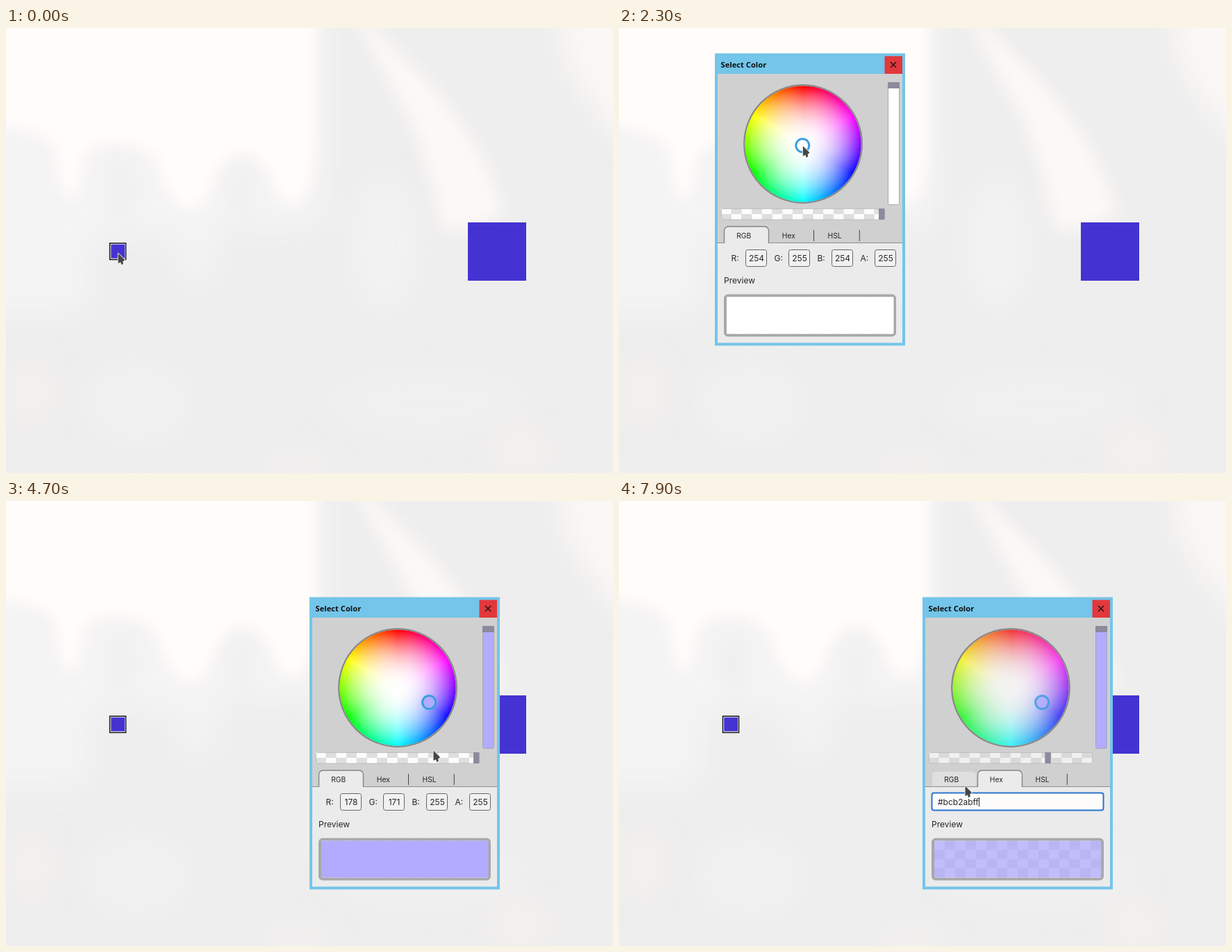
These frames come from a looping animation (874 by 641 pixels, 8 s). An HTML page with a canvas:

```html
<!DOCTYPE html>
<html lang="en">
<head>
<meta charset="utf-8">
<title>Color picker</title>
<style>
html, body { margin: 0; width: 100%; height: 100%; overflow: hidden; background: #eee; }
canvas { display: block; width: 874px; height: 641px; }
</style>
</head>
<body>
<canvas id="stage" width="874" height="641"></canvas>
<script>
const W = 874, H = 641, LOOP = 8000, STEP = 100;
const BLUE = '#4433d2', SKY = '#73c5e9', PANEL = '#ebebeb', GREY = '#d0d0d0';
const HANDLE = '#8b8b9c', INK = '#262626';
const CX = 265, CY = 167, RADIUS = 83.5;
const stage = document.getElementById('stage').getContext('2d');

function layer(w, h) {
  const canvas = document.createElement('canvas');
  canvas.width = w;
  canvas.height = h;
  return canvas.getContext('2d');
}

// Rows are [time, ...values]; values ease from one row to the next.
function track(rows, t) {
  const next = rows.findIndex(row => row[0] > t);
  if (next === 0) return rows[0].slice(1);
  if (next < 0) return rows[rows.length - 1].slice(1);
  const a = rows[next - 1], b = rows[next];
  const p = (t - a[0]) / (b[0] - a[0]);
  const k = p * p * (3 - 2 * p);
  return a.slice(1).map((v, i) => v + (b[i + 1] - v) * k);
}

const pointerPath = [
  [400, 161, 324], [500, 162, 324], [1100, 162, 324], [1500, 286, 38], [1600, 288, 43],
  [1800, 269, 150], [2400, 264, 171], [3000, 264, 171], [3100, 291, 51],
  [3200, 291, 51], [3500, 590, 153.5], [3600, 590, 153.5], [3900, 563, 273],
  [4000, 563, 273], [4400, 610, 290], [4700, 615, 359], [4900, 677, 367],
  [5700, 596, 370], [5800, 597, 370], [6000, 608, 370], [6400, 545, 396],
  [6600, 545, 398], [7000, 520, 430], [7500, 520, 430], [7900, 498, 410]
];
const windowPath = [[3200, 0, 0], [3500, 299, 102]];
const windowFade = [[900, 0], [1000, 0.4], [1100, 1], [3000, 1], [3200, 0.8], [3600, 0.8], [3800, 1]];
const pickPath = [[1800, 0, 0], [1900, 4, -14], [2400, -0.7, 4.5], [4000, -0.7, 4.5], [4400, 45.6, 21.3]];
const alphaPath = [[4900, 255], [5700, 176], [5800, 176], [6000, 188]];

// Hue runs counter-clockwise from red at the top.
function wheelColor(x, y) {
  const sat = Math.min(1, Math.hypot(x, y) / RADIUS) ** 2.2;
  const hue = (Math.atan2(-x, -y) * 3 / Math.PI + 6) % 6;
  return [5, 3, 1].map(n => {
    const k = (n + hue) % 6;
    return Math.floor(255 * (1 - sat * Math.max(0, Math.min(k, 4 - k, 1))));
  });
}

function makeWheel() {
  const c = layer(170, 170), image = c.createImageData(170, 170);
  for (let y = 0; y < 170; y++) {
    for (let x = 0; x < 170; x++) {
      image.data.set([...wheelColor(x - 84.5, y - 84.5), 255], (y * 170 + x) * 4);
    }
  }
  c.putImageData(image, 0, 0);
  return c.canvas;
}

function makeBackdrop() {
  const c = layer(W, H);
  c.fillStyle = '#eee';
  c.fillRect(0, 0, W, H);
  const shape = (color, blur, path) => {
    c.filter = `blur(${blur}px)`;
    c.fillStyle = color;
    c.fill(new Path2D(path));
  };
  const blob = (color, blur, x, y, rx, ry) => {
    c.filter = `blur(${blur}px)`;
    c.fillStyle = color;
    c.beginPath();
    c.ellipse(x, y, rx, ry, 0, 0, 7);
    c.fill();
  };
  shape('#f5f4f4', 25, 'M-60-60H460V290H300V370H250V300H120V410H-60Z');
  blob('#f3f2f2', 22, 545, 310, 50, 100);
  blob('#f2f1f1', 24, 190, 540, 80, 60);
  blob('#f0f0f0', 20, 610, 540, 150, 50);
  shape('#fffcfa', 10, 'M-60-60H447V150Q445 250 413 255Q388 250 380 210Q340 150 303 210Q290 262 262 262Q230 250 215 185Q150 145 112 185Q106 248 92 248Q78 240 72 175Q55 140-60 140Z');
  shape('#fcf8f6', 13, 'M475-60L570 40Q680 140 718 265Q670 300 625 290Q610 190 575 120Z');
  shape('#faf7f5', 20, 'M800-60H940V210Q850 140 800 40Z');
  blob('#eeeff0', 12, 165, 235, 17, 45);
  blob('#eff0f0', 12, 340, 240, 17, 40);
  blob('#f4f0ee', 22, 35, 525, 35, 50);
  blob('#f4f0ee', 22, 740, 610, 45, 40);
  blob('#f2f0ef', 20, 420, 630, 60, 25);
  return c.canvas;
}

const wheel = makeWheel(), backdrop = makeBackdrop();
const dialog = layer(W, H);

function box(c, x, y, w, h, fill, stroke, radius = 0, line = 1) {
  c.beginPath();
  c.roundRect(x, y, w, h, radius);
  if (fill) { c.fillStyle = fill; c.fill(); }
  if (stroke) { c.strokeStyle = stroke; c.lineWidth = line; c.stroke(); }
}

function line(c, x1, y1, x2, y2, color, width = 1) {
  c.strokeStyle = color;
  c.lineWidth = width;
  c.beginPath();
  c.moveTo(x1, y1);
  c.lineTo(x2, y2);
  c.stroke();
}

function text(c, str, x, y, size, align = 'left') {
  c.font = `${size}px Inter, sans-serif`;
  c.textAlign = align;
  c.fillStyle = INK;
  c.fillText(str, x, y);
}

function checker(c, x, y, cols, rows, w, h, light, dark) {
  for (let i = 0; i < cols * rows; i++) {
    const col = i % cols, row = Math.floor(i / cols);
    c.fillStyle = (col + row) % 2 ? dark : light;
    c.fillRect(x + col * w, y + row * h, w, h);
  }
}

function drawFrame(c) {
  box(c, 138, 36.5, 274, 421, SKY);
  c.font = 'bold 11.2px "Noto Sans", sans-serif';
  c.textAlign = 'left';
  c.fillStyle = '#111';
  c.fillText('Select Color', 146.5, 57);
  box(c, 382.5, 40.5, 25.5, 25.5, '#e2383c');
  line(c, 391, 49, 399, 57, '#111', 1.2);
  line(c, 399, 49, 391, 57, '#111', 1.2);
  box(c, 142, 66, 266, 243.5, GREY);
  box(c, 142, 309.5, 266, 144, PANEL);
}

function drawWheel(c, pick, color, opacity) {
  c.save();
  c.beginPath();
  c.arc(CX, CY, 84.6, 0, 7);
  c.strokeStyle = '#888';
  c.lineWidth = 2.6;
  c.stroke();
  c.beginPath();
  c.arc(CX, CY, RADIUS, 0, 7);
  c.fillStyle = GREY;
  c.fill();
  c.clip();
  c.globalAlpha = opacity;
  c.drawImage(wheel, CX - 84.5, CY - 84.5);
  c.restore();

  c.save();
  c.globalAlpha = 0.4 + 0.6 * opacity;
  c.beginPath();
  c.arc(CX + pick[0] - 0.5, CY + pick[1] - 0.3, 9.5, 0, 7);
  c.fillStyle = color;
  c.fill();
  c.strokeStyle = '#3a9fdc';
  c.lineWidth = 3;
  c.stroke();
  c.restore();
}

function drawSliders(c, color, opacity) {
  box(c, 387.5, 78.5, 16, 176, color, '#a9a9a9', 2);
  box(c, 387, 78, 17, 9, HANDLE);
  c.save();
  c.globalAlpha = opacity;
  checker(c, 147, 260, 16, 2, 14.72, 8, '#fdfcfc', '#dedede');
  c.restore();
  box(c, 147.5, 260.5, 235, 15.5, null, '#b8b8b8', 2, 0.8);
  box(c, 147 + opacity * 227, 260, 8.5, 16, HANDLE);
}

function drawTabs(c, hex, hover) {
  line(c, 142, 309.5, 408, 309.5, '#8c8c8c');
  if (hover) box(c, 152, 288, 63, 21, '#dfdfdf', null, [5, 5, 0, 0]);
  const x = hex ? 217.5 : 151.5;
  c.beginPath();
  c.moveTo(x, 311);
  c.lineTo(x, 292);
  c.arcTo(x, 286, x + 6, 286, 6);
  c.arcTo(x + 64, 286, x + 64, 292, 6);
  c.lineTo(x + 64, 311);
  c.fillStyle = PANEL;
  c.fill();
  c.strokeStyle = '#858585';
  c.lineWidth = 1.4;
  c.stroke();
  box(c, x - 1, 310, 66, 2, PANEL);
  if (!hex) line(c, 280.5, 291, 280.5, 307, '#444');
  line(c, 346.3, 291, 346.3, 307, '#444');
  text(c, 'RGB', 179.7, 302.5, 10.3, 'center');
  text(c, 'Hex', 244.3, 302.5, 10.3, 'center');
  text(c, 'HSL', 310.6, 302.5, 10.3, 'center');
}

function drawChannels(c, values) {
  values.forEach((value, i) => {
    const x = 182.5 + i * 62;
    text(c, 'RGBA'[i] + ':', x - 21, 335.5, 12);
    box(c, x, 319.5, 30, 24, '#f2f1f1', '#666', 3);
    text(c, value, x + 15.5, 336, 12, 'center');
  });
}

function drawHexField(c, value, focused) {
  box(c, 151.5, 318.5, 247, 25, '#fdfcfb', focused ? '#2a74d0' : '#777', 3, focused ? 2 : 1);
  text(c, value, 160, 336, 12);
  if (focused) {
    const x = Math.round(161 + c.measureText(value).width) - 0.5;
    line(c, x, 325, x, 338, '#222');
  }
}

function drawPreview(c, color, opacity) {
  text(c, 'Preview', 151, 368, 12);
  box(c, 153, 385.5, 244, 57, null, '#a8a8a8', 4, 4);
  checker(c, 155, 387.5, 16, 4, 15, 13.25, PANEL, GREY);
  c.save();
  c.globalAlpha = opacity;
  box(c, 155, 387.5, 240.5, 53, color, null, 1);
  c.restore();
}

function drawDialog(t) {
  const c = dialog;
  const pick = track(pickPath, t);
  const rgb = t < 1900 ? [1, 1, 1] : wheelColor(...pick);
  const alpha = Math.round(track(alphaPath, t)[0]);
  const color = `rgb(${rgb})`, opacity = alpha / 255;
  const hex = t >= 6500;
  const [dx, dy] = track(windowPath, t);
  c.setTransform(1, 0, 0, 1, 0, 0);
  c.clearRect(0, 0, W, H);
  c.translate(Math.round(dx), Math.round(dy));
  drawFrame(c);
  drawWheel(c, pick, color, opacity);
  drawSliders(c, color, opacity);
  drawTabs(c, hex, t >= 7800);
  if (hex) {
    const digits = [alpha, ...rgb].map(v => v.toString(16).padStart(2, '0'));
    drawHexField(c, '#' + digits.join(''), t >= 7100);
  } else {
    drawChannels(c, [...rgb, alpha]);
  }
  drawPreview(c, color, opacity);
}

function drawArrow(c) {
  c.fillStyle = '#464646';
  c.strokeStyle = '#f4f4f4';
  c.lineWidth = 1.6;
  c.lineJoin = 'round';
  const shape = new Path2D('M.5.5V15L4 13.2L5.5 17.2L7.8 15.6L7.2 12.5L10 10Z');
  c.stroke(shape);
  c.fill(shape);
}

function drawMove(c) {
  const arrow = new Path2D('M0-10.5L4-6H-4Z');
  c.strokeStyle = '#fff';
  c.lineWidth = 1.6;
  c.fillStyle = '#3c3c3c';
  for (let i = 0; i < 4; i++) {
    c.stroke(arrow);
    c.fill(arrow);
    c.rotate(Math.PI / 2);
  }
  c.beginPath();
  c.arc(0, 0, 3, 0, 7);
  c.fillStyle = '#ee7a3c';
  c.fill();
  c.stroke();
}

function render(t) {
  const c = stage;
  c.drawImage(backdrop, 0, 0);
  box(c, 665, 280, 84, 84, BLUE);
  box(c, 149.5, 310, 23, 23.5, '#fff', '#111', 0, 1.5);
  box(c, 151.2, 311.7, 19.8, 20, BLUE);

  const fade = track(windowFade, t)[0];
  if (fade > 0) {
    drawDialog(t);
    c.globalAlpha = fade;
    c.drawImage(dialog.canvas, 0, 0);
    c.globalAlpha = 1;
  }

  c.save();
  c.translate(...track(pointerPath, t));
  if (t >= 3100 && t < 3700) drawMove(c);
  else drawArrow(c);
  c.restore();
}

const start = performance.now();
function tick() {
  const t = (performance.now() - start) % LOOP;
  render(Math.floor(t / STEP) * STEP);
  requestAnimationFrame(tick);
}
tick();
</script>
</body>
</html>
```
